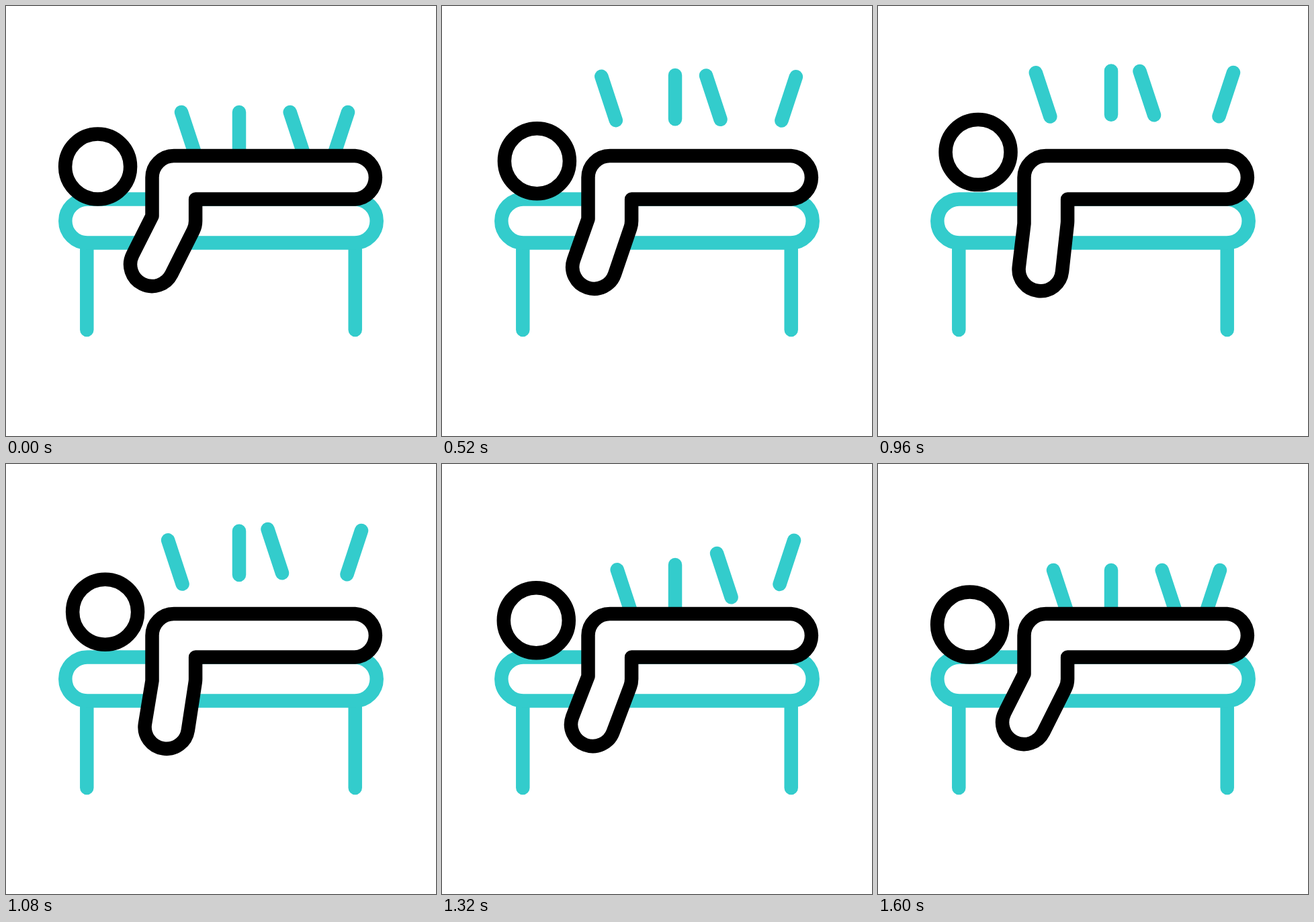
Recreate the animation shown at these times as an HTML page. Size 640 by 640 pixels, loop 1.64 s.

```html
<!DOCTYPE html>
<html lang="en">
<head>
<meta charset="utf-8">
<title>Acupuncture</title>
<style>
  html, body { margin: 0; width: 100%; height: 100%; overflow: hidden; background: #fff; }
  svg { display: block; width: 100vw; height: 100vh; }
  g { stroke-width: 20.5; stroke-linecap: round; stroke-linejoin: round; }
</style>
</head>
<body>
<svg viewBox="0 0 640 640">
  <g fill="none" stroke="#3cc">
    <path d="M120.3 353V482M519.7 353V482"/>
    <rect x="88.3" y="287.5" width="463.4" height="65" rx="32.5"/>
    <path id="needles"/>
  </g>
  <g fill="#fff" stroke="#000">
    <circle id="head" r="48.5"/>
    <path id="body"/>
  </g>
</svg>
<script>
const LOOP = 1640, STEP = 40;
const $ = id => document.getElementById(id);

// cubic-bezier(.5, 0, .5, 1)
function ease(x) {
  if (x <= 0) return 0;
  if (x >= 1) return 1;
  let lo = 0, hi = 1;
  for (let i = 0; i < 24; i++) {
    const s = (lo + hi) / 2;
    if (1.5 * s * (1 - s) + s ** 3 < x) lo = s; else hi = s;
  }
  return lo * lo * (3 - 2 * lo);
}

const ramp = (t, from, to) => ease((t - from) / (to - from));

// top x, horizontal lean, travel when lifted
const needles = [
  [261, 21.5, -26.5, -59.5],
  [347, 0, 0, -61.5],
  [422.7, 21.5, -33.2, -61],
  [509, -21.5, 20, -59]
];

function needlePath(t) {
  return needles.map(([x, lean, dx, dy], i) => {
    const start = 920 + 80 * i;
    const lift = ramp(t, 100, 660) - ramp(t, start, start + 440);
    return `M${x + dx * lift} ${158 + dy * lift}l${lean} 65.3`;
  }).join('');
}

function bodyPath(p) {
  const angle = (26.6 - 20.7 * p) * Math.PI / 180;
  const c = Math.cos(angle), s = Math.sin(angle), r = 32.3;
  // point at (across, along) the forearm, measured from the elbow
  const at = (across, along) =>
    `${249.8 + across * c - along * s} ${320 + across * s + along * c}`;
  const arc = `A${r} ${r} 0 0`;
  return `M282.1 287.5V320${arc} 1 ${at(r, 0)}L${at(r, 72.4)}` +
    `${arc} 1 ${at(-r, 72.4)}L217.5 ${312.7 + 11.5 * p}V255.3` +
    `${arc} 1 249.8 223H519.4${arc} 1 519.4 287.5Z`;
}

function draw(now) {
  const t = Math.floor(now % LOOP / STEP) * STEP;
  const p = ramp(t, 240, 880) - ramp(t, 880, 1600);
  $('needles').setAttribute('d', needlePath(t));
  $('body').setAttribute('d', bodyPath(p));
  $('head').setAttribute('cx', 136.6 + 12.7 * p);
  $('head').setAttribute('cy', 239 - 21.8 * p);
}

const begin = performance.now();
function tick() {
  draw(performance.now() - begin);
  requestAnimationFrame(tick);
}
tick();
</script>
</body>
</html>
```
